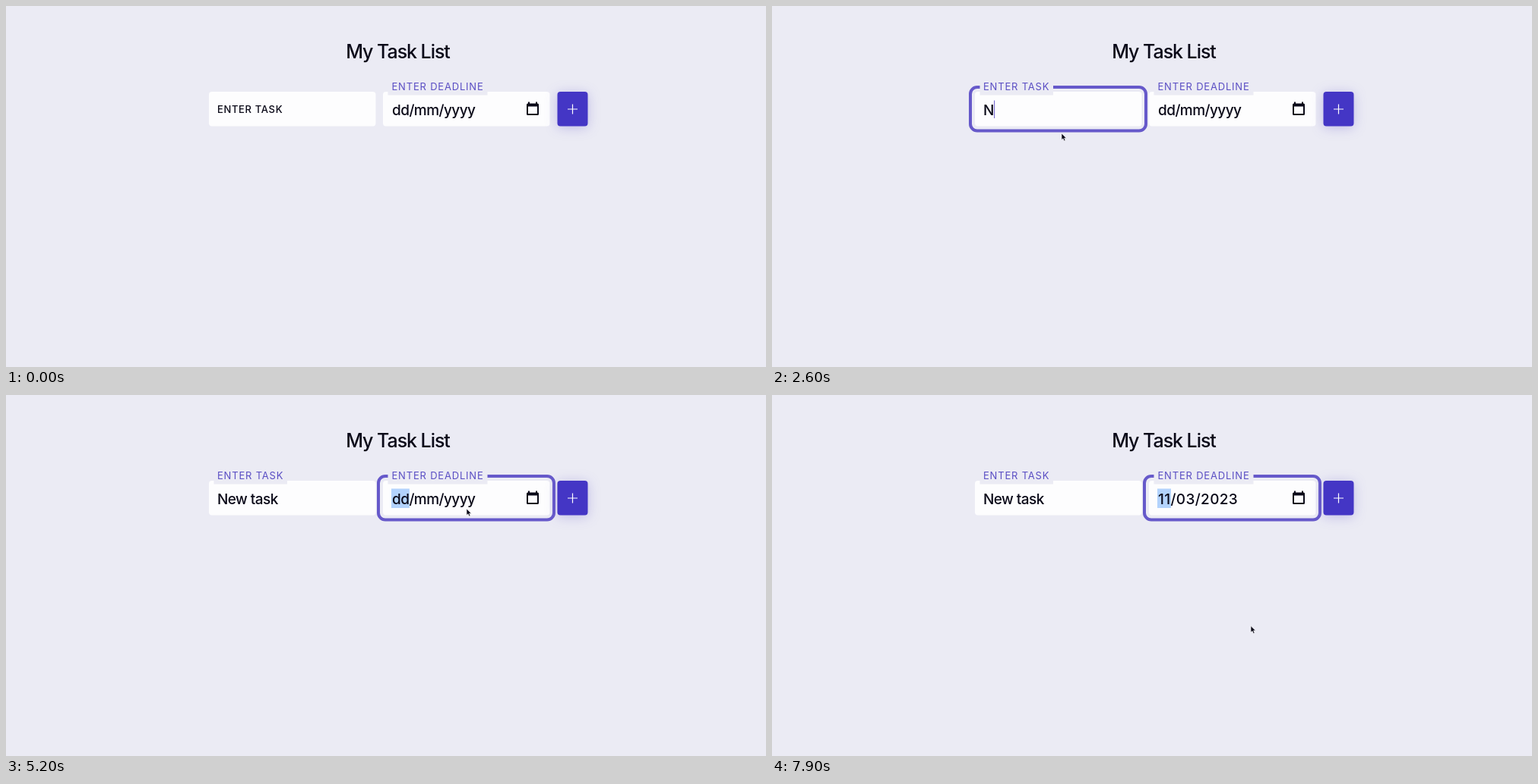
An HTML page for the animation above (8000 ms loop, 1000 by 476 pixels).

```html
<!DOCTYPE html>
<html lang="en">
<head>
<meta charset="utf-8">
<title>My Task List</title>
<style>
  html, body { margin: 0; width: 100%; height: 100%; overflow: hidden; background: #ebebf4; }
  svg { display: block; width: 100%; height: 100%; font-family: Inter, "Open Sans", sans-serif; fill: #0a0918; }
  text { white-space: pre; }
  .title { font-size: 25px; font-weight: 450; letter-spacing: -1.05px; text-anchor: middle; }
  .value { font-size: 19px; font-weight: 450; letter-spacing: -.55px; }
  .value.filled { letter-spacing: .35px; }
  .label { font-size: 13px; letter-spacing: .8px; fill: #5b4fc4; }
  .label.resting { fill: #0a0918; font-weight: 450; letter-spacing: .65px; }
  .field { fill: #fdfdfe; }
  .tag { fill: #ebebf4; }
  .ring { fill: none; stroke: #6659ca; stroke-width: 4; }
  .caret { fill: #6659ca; }
  .mark { fill: #b3d3fd; }
  .button { fill: #4436c5; filter: drop-shadow(0 2px 8px rgba(68, 54, 197, .26)); }
  .plus { stroke: #fff; stroke-width: 1.2; }
  .arrow { stroke: #fff; stroke-width: .6; }
  .beam { fill: none; stroke: #55546a; stroke-width: .9; }
</style>
</head>
<body>
<svg viewBox="0 0 1000 476">
  <text class="title" x="515.5" y="68.5">My Task List</text>

  <rect class="field" x="267" y="113" width="219.5" height="45.5" rx="4"/>
  <rect class="field" x="496" y="113" width="219.5" height="45.5" rx="4"/>
  <rect class="button" x="725.5" y="113" width="40" height="45.5" rx="4"/>
  <path class="plus" d="M739 136h13M745.5 129.5v13"/>

  <rect class="ring" id="ring" y="107" width="231" height="57.5" rx="9"/>

  <rect class="tag" id="taskTag" x="273.5" y="97" width="96.5" height="20.5"/>
  <text class="label" id="taskLabel" x="278">ENTER TASK</text>
  <text class="value" id="task" x="278" y="143.5"></text>
  <rect class="caret" id="caret" y="124.5" width="1" height="23.5"/>

  <rect class="tag" x="502.5" y="97" width="131" height="20.5"/>
  <text class="label" x="507.5" y="111">ENTER DEADLINE</text>
  <rect class="mark" id="mark" x="507" y="123.5" height="25.5"/>
  <text class="value" id="date" x="508" y="143.5"></text>

  <!-- calendar icon -->
  <path fill-rule="evenodd" d="M687 126.5h2v2h8v-2h2v2h.5q1.500 0 1.500 1.500v12.500q0 1.500-1.500 1.500h-13q-1.500 0-1.500-1.500v-12.500q0-1.500 1.500-1.500h.5zM687 132.500v9.500h12v-9.500z"/>

  <g id="pointer">
    <path class="arrow" id="arrow" d="M0 0v8.500l2-1.700 1.500 3.200 1.500-.7-1.400-3.100h2.700z"/>
    <path class="beam" id="beam" d="M-2-4Q0-4 0-3Q0-4 2-4M0-3V3M-2 4Q0 4 0 3Q0 4 2 4"/>
  </g>
</svg>
<script>
const LOOP = 8000, TICK = 100;
const FOCUS_TASK = 900, FOCUS_DATE = 4800, PICK_DATE = 7500;
const WORD = "New task", TYPE_START = 2600, KEY_GAP = 215;

// each glide carries the pointer to its next stop
const GLIDE = 300, ENTRY = { x: 392, y: 193 };
const STOPS = [
  { t: 400, x: 372, y: 147 },     // into the task field
  { t: 800, x: 372, y: 161 },     // drifting out of it
  { t: 1500, x: 381, y: 168 },
  { t: 4500, x: 606, y: 150 },    // deadline field
  { t: 5200, x: 690, y: 138 },    // calendar icon
  { t: 5800, x: 647, y: 173.5 },  // picker
  { t: 7500, x: 630, y: 304.5 }   // chosen day
];

const el = {};
for (const node of document.querySelectorAll("[id]")) el[node.id] = node;

const show = (node, on) => node.setAttribute("visibility", on ? "inherit" : "hidden");
const clamp = v => Math.min(1, Math.max(0, v));
const ease = v => v * v * (3 - 2 * v);

function setText(node, text) {
  if (node.textContent !== text) node.textContent = text;
}

function pointerAt(t) {
  return STOPS.reduce((from, to) => {
    const k = ease(clamp((t - to.t) / GLIDE));
    return { x: from.x + (to.x - from.x) * k, y: from.y + (to.y - from.y) * k };
  }, ENTRY);
}

function drawTask(t) {
  const count = Math.min(WORD.length, Math.max(0, Math.floor((t - TYPE_START) / KEY_GAP) + 1));
  setText(el.task, WORD.slice(0, count));

  const rise = ease(clamp((t - FOCUS_TASK + TICK) / 200));
  el.taskLabel.setAttribute("y", 141.3 - 30.3 * rise);
  el.taskLabel.classList.toggle("resting", rise < .5);
  show(el.taskTag, rise === 1);

  // each keystroke restarts the blink
  const since = t - (count ? TYPE_START + (count - 1) * KEY_GAP : FOCUS_TASK);
  const focused = t >= FOCUS_TASK && t < FOCUS_DATE;
  show(el.caret, focused && since % 1000 < 500);
  const width = count ? el.task.getComputedTextLength() : 0;
  el.caret.setAttribute("x", 278 + width + .3);
}

function drawDate(t) {
  const picked = t >= PICK_DATE;
  setText(el.date, picked ? "11/03/2023" : "dd/mm/yyyy");
  el.date.classList.toggle("filled", picked);
  show(el.mark, t >= FOCUS_DATE);
  el.mark.setAttribute("width", el.date.getSubStringLength(0, 2) + 1.5);
}

function drawPointer(t) {
  const { x, y } = pointerAt(t);
  const overText = x > 267 && x < 486 && y > 113 && y < 163;
  // hidden before it enters and while typing
  show(el.pointer, t >= 400 && (t < 3000 || t >= 4400));
  show(el.beam, overText);
  show(el.arrow, !overText);
  el.pointer.setAttribute("transform", `translate(${x} ${y})`);
}

function draw(now) {
  const t = Math.floor((now % LOOP) / TICK) * TICK;
  show(el.ring, t >= FOCUS_TASK);
  el.ring.setAttribute("x", t < FOCUS_DATE ? 261 : 490);
  drawTask(t);
  drawDate(t);
  drawPointer(t);
}

const start = performance.now();
function loop() {
  draw(performance.now() - start);
  requestAnimationFrame(loop);
}
loop();
</script>
</body>
</html>
```
